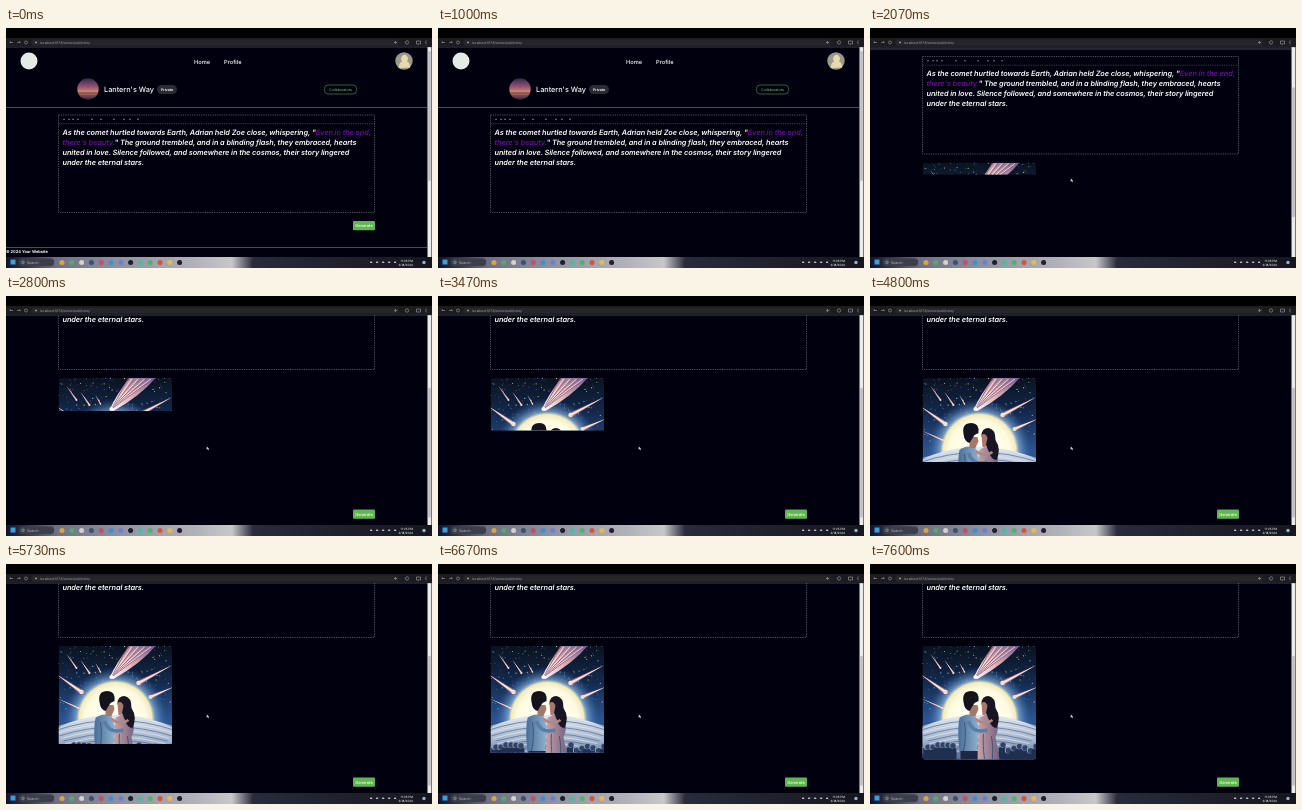
Recreate the animation shown at these times as an HTML page. Size 426 by 240 pixels, loop 7.67 s.

```html
<!DOCTYPE html>
<html lang="en">
<head>
<meta charset="utf-8">
<title>Story editor</title>
<style>
html, body { margin: 0; width: 100%; height: 100%; overflow: hidden; background: #000; }
svg { display: block; width: 100%; height: 100%; }
text { font-family: Inter, "Open Sans", sans-serif; fill: #fff; white-space: pre; text-rendering: geometricPrecision; }
.story { font-size: 7.35px; font-weight: 600; font-style: italic; letter-spacing: -.01em; }
.quote { fill: #6a0a9c; }
.tiny { font-size: 3.6px; }
.small { font-size: 5.7px; font-weight: 500; }
.rule { stroke: #6f6f78; stroke-width: .7; fill: none; }
.dots { stroke-dasharray: 1.3 1; }
</style>
</head>
<body>
<svg viewBox="0 0 426 240" xmlns="http://www.w3.org/2000/svg">
  <defs>
    <clipPath id="view"><rect y="19" width="426" height="210"/></clipPath>
    <clipPath id="reveal"><rect id="shade" width="113.5" height="0"/></clipPath>
    <clipPath id="frame"><rect width="113.5" height="113.5" rx="3"/></clipPath>
    <linearGradient id="dusk" x2="0" y2="1">
      <stop stop-color="#33284d"/><stop offset=".45" stop-color="#a25a76"/>
      <stop offset=".62" stop-color="#d08a62"/><stop offset="1" stop-color="#2c1d35"/>
    </linearGradient>
    <linearGradient id="sky" x2="0" y2="1">
      <stop stop-color="#0a1220"/><stop offset=".3" stop-color="#12284c"/><stop offset=".65" stop-color="#2c5590"/>
    </linearGradient>
    <radialGradient id="sun">
      <stop stop-color="#fffef4"/><stop offset=".58" stop-color="#fffbe2"/><stop offset=".7" stop-color="#f3ebbc"/>
      <stop offset=".76" stop-color="#7fa6cf" stop-opacity=".8"/><stop offset="1" stop-color="#2f62a8" stop-opacity="0"/>
    </radialGradient>
    <linearGradient id="land" x2="0" y2="1">
      <stop stop-color="#dfe5ee"/><stop offset=".2" stop-color="#a3b4cc"/>
      <stop offset=".32" stop-color="#5c779f"/><stop offset=".5" stop-color="#263a60"/>
    </linearGradient>
    <linearGradient id="shirt">
      <stop stop-color="#4a6d98"/><stop offset="1" stop-color="#8fb0cc"/>
    </linearGradient>
    <linearGradient id="dress">
      <stop stop-color="#c7a3a8"/><stop offset="1" stop-color="#73607f"/>
    </linearGradient>
    <linearGradient id="tail" x1="0" y1="1" x2="1" y2="0">
      <stop stop-color="#fff"/><stop offset=".45" stop-color="#e3b3b4"/><stop offset="1" stop-color="#735a8e"/>
    </linearGradient>
    <linearGradient id="bar">
      <stop stop-color="#10142a"/><stop offset=".05" stop-color="#34374a"/><stop offset=".12" stop-color="#6f7182"/>
      <stop offset=".28" stop-color="#9294a0"/><stop offset=".45" stop-color="#b2b2ba"/><stop offset=".53" stop-color="#c8c8ca"/>
      <stop offset=".58" stop-color="#2a2b3a"/><stop offset="1" stop-color="#15161f"/>
    </linearGradient>
  </defs>

  <rect width="426" height="240" fill="#000"/>
  <rect y="19" width="426" height="210" fill="#00000e"/>

  <g clip-path="url(#view)">
    <g id="page">
      <circle cx="23" cy="33" r="8.5" fill="#e4ebe4"/>
      <text class="small" x="188" y="35.5">Home</text>
      <text class="small" x="218" y="35.5">Profile</text>
      <circle cx="398" cy="33" r="8.7" fill="#9b998b"/>
      <path d="M393 40v-3q1-3 3-3.500a3.300 4 0 1 1 5 0q3 1 3 6z" fill="#e4dcaf"/>

      <circle cx="82" cy="61" r="10.700" fill="url(#dusk)"/>
      <path d="M72.500 65h19M74 68h16" stroke="#6b3d66"/>
      <text x="98" y="64" font-size="7.300" font-weight="500">Lantern's Way</text>
      <rect x="151" y="57" width="20" height="9" rx="4.500" fill="#2b2b34"/>
      <text class="tiny" x="161" y="62.800" text-anchor="middle" font-weight="600">Private</text>
      <rect x="318.500" y="57" width="32" height="9" rx="3.500" fill="none" stroke="#3f8b4a" stroke-width=".7"/>
      <text class="tiny" x="334.500" y="62.800" text-anchor="middle" style="fill:#70c878">Collaborators</text>
      <path class="rule" d="M0 79.500H421"/>

      <rect class="rule dots" x="52.500" y="87" width="316" height="97.500"/>
      <path class="rule dots" d="M52.500 95.700H368.500" opacity=".75"/>
      <g id="tools" fill="#777780"></g>
      <text class="story" x="56.500" y="106.500">As the comet hurtled towards Earth, Adrian held Zoe close, whispering, "<tspan class="quote">Even in the end,</tspan></text>
      <text class="story" x="56.500" y="116.600"><tspan class="quote">there's beauty.</tspan>" The ground trembled, and in a blinding flash, they embraced, hearts</text>
      <text class="story" x="56.500" y="126.700">united in love. Silence followed, and somewhere in the cosmos, their story lingered</text>
      <text class="story" x="56.500" y="136.800">under the eternal stars.</text>

      <g transform="translate(52.500 193)"><g clip-path="url(#reveal)"><g id="art" clip-path="url(#frame)"></g></g></g>

      <g id="below">
        <rect x="347" y="193" width="22" height="9.300" rx="1" fill="#5fb653"/>
        <text x="358" y="199.200" font-size="4" text-anchor="middle" font-weight="500">Generate</text>
        <path class="rule" d="M0 219.500H421"/>
        <text x="0" y="225" font-size="4" font-weight="700">© 2024 Your Website</text>
      </g>
    </g>
    <rect x="421.500" y="19" width="4" height="210" fill="#ececea"/>
    <rect id="thumb" x="422.300" y="23" width="2.400" height="130" rx="1.200" fill="#bcbcc2"/>
  </g>

  <rect y="10" width="426" height="9" fill="#1b1b20"/>
  <path class="rule" d="M0 19.300H426" opacity=".5"/>
  <rect x="25" y="11.500" width="368" height="6" rx="3" fill="#25252b"/>
  <g fill="none" stroke="#8d8d94" stroke-width=".7">
    <path d="M7 14.500H3.500l1.500-1.500M11 14.500h3.500l-1.500-1.500M389.500 13v3M388 14.500h3"/>
    <circle cx="20" cy="14.500" r="1.500"/><circle cx="401" cy="14.500" r="1.700"/>
    <path d="M410.500 13h4v3h-4zM420 12.500v4"/>
  </g>
  <circle cx="30" cy="14.500" r="1" fill="#999"/>
  <text x="34" y="15.700" font-size="3.300" style="fill:#a9a9ae">localhost:5173/stories/edit/story</text>

  <rect y="229" width="426" height="11" fill="url(#bar)"/>
  <rect x="4.500" y="231.500" width="5" height="5" fill="#3b9de0"/>
  <rect x="13" y="230.500" width="35" height="7.500" rx="3.500" fill="#3c3e4c"/>
  <circle cx="17" cy="234.300" r="1.200" fill="none" stroke="#bbb" stroke-width=".6"/>
  <text x="21" y="235.500" font-size="3.500" style="fill:#b6b6bd">Search</text>
  <g id="apps"></g>
  <g font-size="3">
    <text x="407" y="233.500" text-anchor="end">11:05 PM</text>
    <text x="407" y="237.500" text-anchor="end">2/18/2024</text>
  </g>
  <circle cx="418" cy="234.500" r="1.700" fill="#91b6cb"/>

  <path id="cursor" d="M200.700 150.500v3.300l.8-.7.8 1.200.6-.4-.7-1.200h1.100z" fill="#dcdcd0"/>
</svg>

<script>
const el = id => document.getElementById(id);
const LOOP = 7670, STEP = 1000 / 15;

function seeded(seed) {
  return () => (seed = seed * 16807 % 2147483647) / 2147483647;
}

const rect = (x, y, w, h, fill, rx = 0) =>
  `<rect x="${x}" y="${y}" width="${w}" height="${h}" rx="${rx}" fill="${fill}"/>`;
const circle = (x, y, r, fill) => `<circle cx="${x}" cy="${y}" r="${r}" fill="${fill}"/>`;
const shape = (d, fill) => `<path d="${d}" fill="${fill}"/>`;
const line = (d, color, width, opacity = 1) =>
  `<path d="${d}" fill="none" stroke="${color}" stroke-width="${width}" opacity="${opacity}"/>`;

// A meteor tapers from its bright head (x, y) back along (dx, dy).
function meteor(x, y, dx, dy, width) {
  const n = width / 2 / Math.hypot(dx, dy), px = -dy * n, py = dx * n;
  const wedge = (k, fill) =>
    shape(`M${x - px * k} ${y - py * k}L${x + dx} ${y + dy}L${x + px * k} ${y + py * k}z`, fill);
  return wedge(1, '#b9808f') + wedge(.5, '#ffe8dc') + circle(x, y, width / 2, '#f8dfd0');
}

function drawArt() {
  const rnd = seeded(41);
  let out = rect(0, 0, 113.5, 113.5, 'url(#sky)');
  for (let i = 0; i < 190; i++)
    out += circle(rnd() * 113, rnd() ** 1.4 * 65, .2 + rnd() * .45, rnd() < .3 ? '#c9bd80' : '#86aed6');
  out += circle(57, 73, 52, 'url(#sun)');

  out += shape('M51 32Q58 16 71 0H97Q83 17 55 33z', 'url(#tail)');
  for (let i = 0; i < 9; i++)
    out += line(`M53 31L${70 + i * 3.2} ${i % 2}`, i % 2 ? '#fff2e6' : '#8a5a80', .8);
  out += circle(53, 31, 2, '#fff');
  out += meteor(23, 46, -24, -17, 4.5) + meteor(31, 27, -9, -13, 2) + meteor(80, 37, 34, -18, 4.5)
       + meteor(92, 51, 23, -10, 4) + meteor(18, 22, -10, -14, 1.8) + meteor(42, 26, -5, -9, 1.5)
       + meteor(20, 62, -20, -9, 2);

  out += '<ellipse cx="57" cy="133" rx="96" ry="64" fill="url(#land)"/>';
  for (let i = 0; i < 12; i++)
    out += line(`M${-5 + i * 2} ${82 + i * 2.6}Q57 ${60 + i * 4} ${119 - i * 2} ${82 + i * 2.6}`,
                i % 2 ? '#46648f' : '#e6ecf3', 1, .65);

  for (let i = 0; i < 14; i++) {
    const x = i < 7 ? i * 5 : 80 + (i - 7) * 5.5, y = 98 + rnd() * 7;
    out += rect(x - 4, y + 2, 8, 16, '#1f2f50', 3.5) + circle(x, y, 3.2, '#8fa0b4') + circle(x + .5, y + .4, 2.7, '#32436a');
  }

  // Woman, then man in front.
  out += shape('M57 72Q66 65 73 72Q78 80 73 91L77 113.500H55z', 'url(#dress)');
  out += shape('M59 58Q59 50 66 50Q73 51 73 62Q79 71 74 82Q69 82 67 75L63 66z', '#171523');
  out += shape('M59 57Q63 54 65 60L63 69H60z', '#a87870');
  out += shape('M37 72Q44 66 53 70L56 80L54 113.500H38Q34 85 37 72z', 'url(#shirt)');
  out += rect(38, 105, 17, 9, '#1c2742');
  out += shape('M47 59H55L56 63L53 70H47z', '#a8776c');
  out += shape('M41 56Q39 45 49 45Q57 45 56 55L52 57L47 65Q42 64 41 56z', '#12131c');
  out += line('M46 75Q50 88 65 84', '#587ea8', 3.5);
  out += line('M70 74Q62 80 53 73', '#b08880', 2.5);
  out += line('M42 76Q44 92 41 105M61 88Q60 98 62 113M69 90Q71 100 70 113', '#34486f', .8);
  el('art').innerHTML = out;
}

function drawIcons() {
  el('tools').innerHTML = [57, 62, 66, 71, 85, 94, 107, 117, 123, 131]
    .map(x => rect(x, 90.8, 2, 1, 'inherit')).join('');
  const colors = ['#d9a447', '#55a875', '#d2d2d2', '#38546d', '#c0506b', '#3b91d0', '#6f7dd0',
                  '#17202e', '#51b8a2', '#4ab46e', '#d0563c', '#e4ba55', '#241b32'];
  let out = colors.map((c, i) => circle(56 + i * 9.8, 234.4, 2.5, c)).join('');
  for (let i = 0; i < 5; i++) out += rect(364 + i * 6, 233.5, 2.3, 1.6, '#b8bac4', .6);
  el('apps').innerHTML = out;
}

function along(t, keys) {
  const i = keys.findIndex(k => t < k[0]);
  if (i === 0) return keys[0][1];
  if (i < 0) return keys[keys.length - 1][1];
  const [t0, v0] = keys[i - 1], [t1, v1] = keys[i];
  return v0 + (v1 - v0) * (t - t0) / (t1 - t0);
}

const scrollKeys = [[1400, 0], [2000, 58.5], [2300, 58.5], [2700, 111]];
const revealKeys = [[1200, 0], [2070, 12], [3470, 52.5], [4800, 84], [5730, 98], [7400, 113.5]];

function render(ms) {
  const t = Math.floor((ms % LOOP) / STEP + .06) * STEP;
  const scroll = along(t, scrollKeys);
  el('page').setAttribute('transform', `translate(0 ${-scroll})`);
  el('thumb').setAttribute('y', 23 + scroll * .62);
  el('shade').setAttribute('height', along(t, revealKeys));
  el('below').setAttribute('transform', `translate(0 ${t < 470 ? 0 : 131.5})`);
  el('cursor').setAttribute('visibility', t < 1400 ? 'hidden' : 'visible');
}

drawArt();
drawIcons();
const start = performance.now();
function tick() {
  render(performance.now() - start);
  requestAnimationFrame(tick);
}
tick();
</script>
</body>
</html>
```
